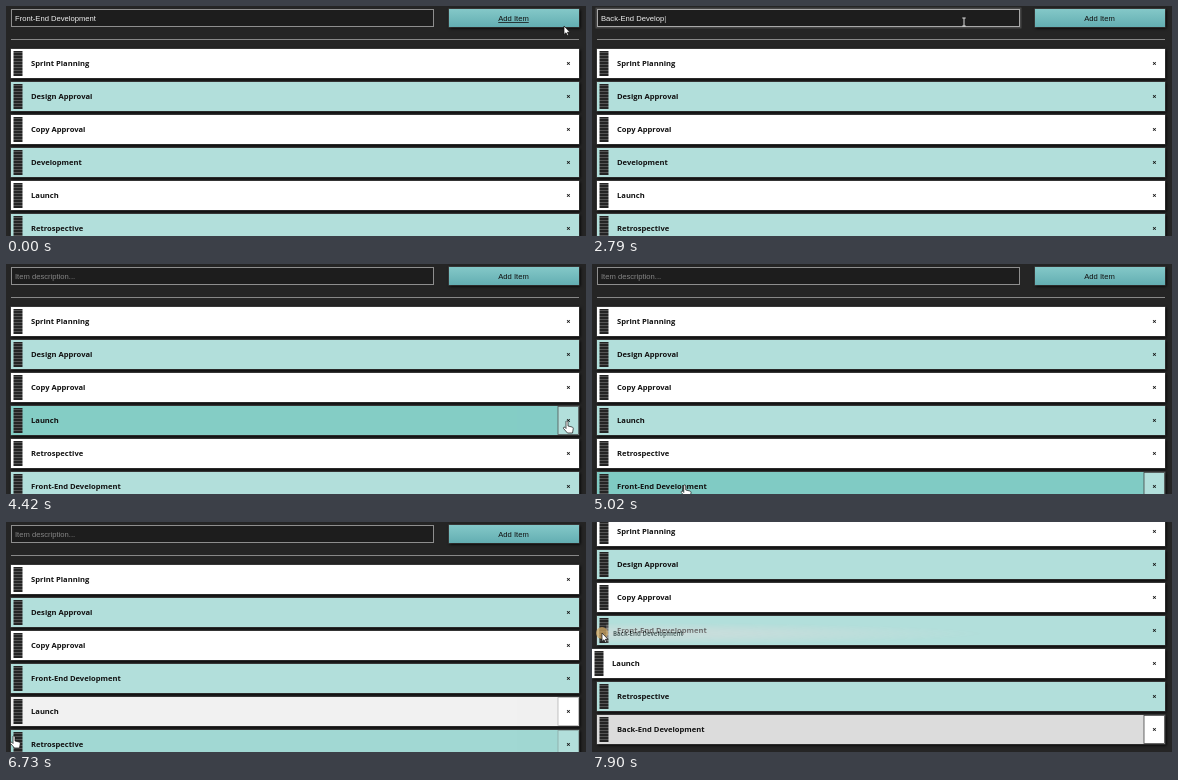
Animation of 580 by 230 pixels, one loop 7.99 s. Source, as an HTML page:

```html
<!DOCTYPE html>
<html lang="en">
<head>
<meta charset="utf-8">
<title>Sortable list</title>
<style>
  html, body { margin: 0; width: 100%; height: 100%; overflow: hidden; background: #252525; }
  svg { display: block; }
  text { font: 7.63px "Liberation Sans", Arial, sans-serif; white-space: pre; }
  .item text { font: bold 7.6px "Open Sans", sans-serif; fill: #111; }
  .mid { text-anchor: middle; }
  .shadow { fill: #000; stroke: #777; stroke-opacity: .6; filter: drop-shadow(1px 1px 1.5px #000); }
</style>
</head>
<body>
<svg width="580" height="230" viewBox="0 0 580 230">
  <defs>
    <linearGradient id="btn" x2="0" y2="1">
      <stop stop-color="#84c8c8"/><stop offset="1" stop-color="#63aeb2"/>
    </linearGradient>
    <radialGradient id="fade" gradientUnits="userSpaceOnUse" cx="0" cy="0" r="1"
      gradientTransform="translate(8 14.5) scale(480 14)">
      <stop stop-color="#fff" stop-opacity=".65"/>
      <stop offset=".4" stop-color="#fff" stop-opacity=".45"/>
      <stop offset="1" stop-color="#fff" stop-opacity="0"/>
    </radialGradient>
    <mask id="ghost" maskUnits="userSpaceOnUse" x="0" y="0" width="568" height="29">
      <rect width="568" height="29" fill="url(#fade)"/>
    </mask>
    <pattern id="grip" width="10" height="3" patternUnits="userSpaceOnUse">
      <rect width="10" height="3" fill="#242424"/><rect y="1" width="10" height="1" fill="#555"/>
    </pattern>
  </defs>
  <g id="page"></g>
  <g id="top"></g>
</svg>
<script>
const LOOP = 7990, FRONT = 'Front-End Development', BACK = 'Back-End Development';
const TASKS = ['Sprint Planning', 'Design Approval', 'Copy Approval', 'Development', 'Launch', 'Retrospective'];
const ADD1 = 400, FOCUS = 1240, ADD2 = 3440, REMOVE = 4250, DROP = 6360;
const page = document.getElementById('page'), overlay = document.getElementById('top');

// pointer path: time, x, y
const PATH = [
  [0, 558, 20], [100, 558, 20], [260, 557, 14], [400, 557, 14], [540, 555, 13], [690, 555, 13],
  [1240, 372, 16], [3140, 372, 16], [3400, 520, 13], [3480, 520, 13], [3640, 528, 146],
  [3850, 531, 152], [3910, 552, 155], [4090, 560, 157], [4630, 560, 157], [4820, 330, 212],
  [5020, 92, 221], [5390, 10, 219], [5660, 10, 219], [5750, 13, 195], [5820, 14, 175],
  [6140, 11, 146], [6360, 11, 146], [6510, 10, 170], [6555, 9, 176], [6620, 8, 203],
  [6670, 8, 209], [6730, 7, 214], [7220, 7, 212], [7360, 10, 210], [7520, 10, 206], [7900, 10, 111]
];

const clamp = v => Math.max(0, Math.min(1, v));
const between = (t, a, b) => t >= a && t < b;
const rowY = i => 43 + 33 * i;

function pointer(t) {
  const i = PATH.findIndex(p => p[0] > t);
  if (i < 0) return PATH[PATH.length - 1].slice(1);
  if (i === 0) return PATH[0].slice(1);
  const [t0, x0, y0] = PATH[i - 1], [t1, x1, y1] = PATH[i];
  const k = (t - t0) / (t1 - t0);
  return [x0 + (x1 - x0) * k, y0 + (y1 - y0) * k];
}

function scroll(t) {
  const k = clamp((t - 6800) / 330);
  return 48 * k * k * (3 - 2 * k);
}

function order(t) {
  const list = TASKS.filter(n => n !== 'Development' || t < REMOVE);
  if (t >= DROP) list.splice(3, 0, FRONT);
  else if (t >= ADD1) list.push(FRONT);
  if (t >= ADD2) list.push(BACK);
  return list;
}

const held = t => between(t, 5490, DROP) ? FRONT : t >= 7360 ? BACK : null;
const dragging = t => between(t, 5700, 6250) || t >= 7520;

function rowAt(t, dy = 0) {
  const [x, y] = pointer(t), d = y + dy + scroll(t) - 43;
  return x >= 5 && x < 573 && d >= 0 && d % 33 < 29 ? order(t)[Math.floor(d / 33)] : null;
}

const hovered = t => held(t) || rowAt(t);
const target = t => dragging(t) ? rowAt(t, 18) : null;
const overButton = t => { const [x, y] = pointer(t); return x > 442 && y < 22; };
const inputFocus = t => between(t, FOCUS, ADD2);
const buttonFocus = t => between(t, 180, FOCUS) || between(t, ADD2, REMOVE);

// linear transition: share of the last ms during which test held
function ease(test, t, ms = 200) {
  let n = 0;
  for (let k = 0; k < 20; k++) n += test(t - ms * k / 20) ? 1 : 0;
  return n / 20;
}

function typed(t) {
  if (t < ADD1) return FRONT;
  if (!inputFocus(t)) return '';
  const n = t < 2220 ? Math.min(8, (t - 1560) / 86 + 1) : 9 + (t - 2220) / 71.8;
  return BACK.slice(0, Math.max(0, Math.floor(n)));
}

const rect = (x, y, w, h, attrs) => `<rect x="${x}" y="${y}" width="${w}" height="${h}" ${attrs}/>`;

function item(name, odd, hover, shift) {
  return `<g class="item">
    ${rect(.5 - shift, .5, 567 + shift, 28, `fill="${odd ? '#b2dfdb' : '#fff'}" stroke="${odd ? '#b2dfdb' : '#fff'}"`)}
    <g opacity="${hover}">
      ${rect(-shift, 0, 547 + shift, 29, `fill="${odd ? '#80cbc4' : '#dcdcdc'}"`)}
      ${rect(547, .5, 20.5, 28, 'fill="none" stroke="#444" stroke-width=".8"')}
    </g>
    <g transform="translate(${2.5 - shift} 2)">${rect(0, 0, 9, 25, 'fill="url(#grip)"')}</g>
    <text x="${20 - shift}" y="17">${name}</text>
    <text x="557.5" y="17" class="mid">×</text>
  </g>`;
}

function header(t) {
  const text = typed(t), glow = ease(inputFocus, t), ring = ease(buttonFocus, t, 120);
  const under = overButton(t) || buttonFocus(t);
  const caret = text && inputFocus(t) ? '<tspan fill="#ccc">|</tspan>' : '';
  return rect(4.5, 2.5, 424, 19, `fill="none" stroke="#fff" stroke-width="2" opacity="${glow * .15}"`)
    + rect(5.5, 3.5, 422, 17, `fill="#1d1d1d" stroke="${glow > .5 ? '#a8a8a8' : '#8e8e8e'}"`)
    + `<text x="9" y="15" fill="${text ? '#eee' : '#858585'}">${text || 'Item description...'}${caret}</text>`
    + rect(443, 3, 130, 18, 'class="shadow"')
    + rect(443, 3, 130, 18, 'fill="url(#btn)"')
    + rect(443, 3, 130, 18, `fill="none" stroke="#fff" stroke-width="1.6" opacity="${ring}"`)
    + `<text x="507.5" y="15" class="mid" fill="${ring > .5 ? '#fff' : '#111'}"
        ${under ? 'text-decoration="underline"' : ''}>Add Item</text>`
    + rect(5, 33, 568, 1, 'fill="#888"');
}

function cursor(t) {
  const [x, y] = pointer(t);
  const ink = 'fill="#fff" stroke="#111" stroke-width=".7" stroke-linejoin="round"';
  let s = '';
  if (held(t)) s += '<circle r="6" fill="#cfa763" opacity=".75"/>';
  if (x < 428 && y < 22)
    s += '<path d="M-1.7-4H1.7M0-4V4M-1.7 4H1.7" stroke="#ddd" fill="none"/>';
  else if (rowAt(t) && !dragging(t))
    s += `<path ${ink} d="M0 .5c.5-1 2-.7 2 .5v4l4 1c1 .3 1.4 1 1.2 2L6.5 12h-5L-2.5 7.5c-.6-1 .8-1.8 1.6-1L0 7.5z"/>`;
  else
    s += `<path ${ink} d="M0 0V8.5L2 6.8 3.3 9.6 4.6 9 3.4 6.3H6z"/>`;
  if (dragging(t) && held(t) === FRONT)
    s += rect(2.5, 7.5, 5, 4, 'fill="#fff" stroke="#333" stroke-width=".8"');
  return `<g transform="translate(${x} ${y})">${s}</g>`;
}

function draw(t) {
  const list = order(t), lift = dragging(t) && held(t);
  page.setAttribute('transform', `translate(0 ${-scroll(t)})`);
  let s = header(t);
  list.forEach((name, i) => {
    const hover = ease(u => hovered(u) === name, t);
    const shift = name === lift ? 0 : 5 * ease(u => target(u) === name, t, 50);
    s += `<g transform="translate(5 ${rowY(i)})">${rect(-shift, 0, 568 + shift, 29, 'class="shadow"')}
      ${item(name, i % 2, hover, shift)}</g>`;
  });
  page.innerHTML = s;

  let o = '';
  if (lift) {
    const [x, y] = pointer(t);
    o = `<g transform="translate(${x - 5} ${y - 11}) scale(.8)"><g mask="url(#ghost)">
      ${item(lift, list.indexOf(lift) % 2, 1, 0)}</g></g>`;
  }
  overlay.innerHTML = o + cursor(t);
}

function tick() {
  draw(performance.now() % LOOP);
  requestAnimationFrame(tick);
}
tick();
</script>
</body>
</html>
```
